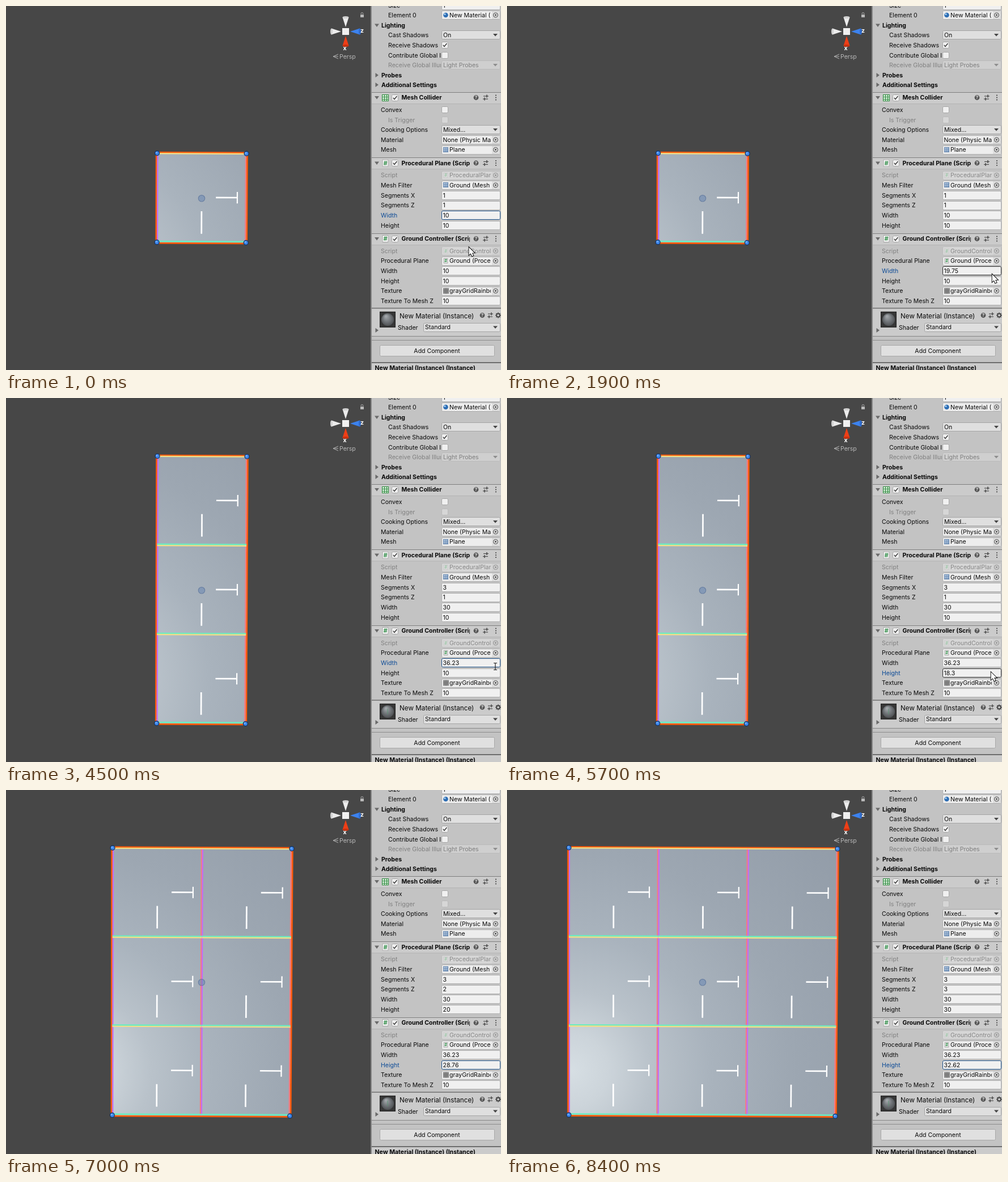
An HTML page with a canvas for the animation above (9200 ms loop, 873 by 642 pixels).

```html
<!DOCTYPE html>
<html lang="en">
<head>
<meta charset="utf-8">
<style>
  html, body { margin: 0; width: 100%; height: 100%; overflow: hidden; background: #474747; }
  canvas { display: block; }
</style>
</head>
<body>
<canvas id="stage" width="873" height="642"></canvas>
<script>
const ctx = document.getElementById('stage').getContext('2d');
const LOOP = 9200, STEP = 100, TAU = Math.PI * 2;

// Keyframes are [time, ...values], linear in between
const widthKeys = [[800, 10], [1900, 19.75], [2100, 21.47], [2900, 23.43], [3300, 26.04], [3800, 34.62], [4100, 36.23]];
const heightKeys = [[5100, 10], [5700, 18.3], [5900, 20.64], [6500, 24.17], [7000, 28.76], [7100, 30.31], [7400, 32.62]];
const cursorPaths = [
  [[0, 816, 425], [100, 816, 425], [500, 757, 467], [600, 757, 467], [700, 747, 467], [800, 747, 467], [2000, 865, 473]],
  [[4500, 863, 474], [4700, 800, 473], [4800, 766, 478], [4900, 758, 488], [5100, 758, 488], [5800, 869, 482]],
  [[7700, 626, 632], [7800, 560, 570], [8000, 390, 503], [8200, 215, 560], [8300, 141, 625]]
];

function sample(keys, t) {
  if (t <= keys[0][0]) return keys[0].slice(1);
  const i = keys.findIndex(k => k[0] >= t);
  if (i < 0) return keys[keys.length - 1].slice(1);
  const a = keys[i - 1], b = keys[i], f = (t - a[0]) / (b[0] - a[0]);
  return a.slice(1).map((v, j) => v + (b[j + 1] - v) * f);
}

function rect(x, y, w, h, fill, border) {
  ctx.fillStyle = fill;
  ctx.fillRect(x, y, w, h);
  if (border) {
    ctx.strokeStyle = border;
    ctx.lineWidth = 1;
    ctx.strokeRect(x + .5, y + .5, w - 1, h - 1);
  }
}

function roundBox(x, y, w, h, fill, border) {
  ctx.beginPath();
  ctx.roundRect(x + .5, y + .5, w - 1, h - 1, 2);
  ctx.fillStyle = fill;
  ctx.fill();
  ctx.strokeStyle = border;
  ctx.lineWidth = 1;
  ctx.stroke();
}

function shape(points, fill, stroke, width = 1) {
  ctx.beginPath();
  points.forEach(p => ctx.lineTo(p[0], p[1]));
  ctx.closePath();
  if (stroke) { ctx.strokeStyle = stroke; ctx.lineWidth = width; ctx.stroke(); }
  if (fill) { ctx.fillStyle = fill; ctx.fill(); }
}

function line(points, color, width = 1) {
  ctx.beginPath();
  points.forEach(p => ctx.lineTo(p[0], p[1]));
  ctx.strokeStyle = color;
  ctx.lineWidth = width;
  ctx.stroke();
}

function disc(x, y, r, fill, stroke, width = 1) {
  ctx.beginPath();
  ctx.arc(x, y, r, 0, TAU);
  if (fill) { ctx.fillStyle = fill; ctx.fill(); }
  if (stroke) { ctx.strokeStyle = stroke; ctx.lineWidth = width; ctx.stroke(); }
}

function text(s, x, y, { color = '#090909', weight = 400, size = 10.56, limit = 873, align = 'left' } = {}) {
  ctx.save();
  ctx.beginPath();
  ctx.rect(0, 0, limit, 642);
  ctx.clip();
  ctx.font = `${weight} ${size}px Inter, sans-serif`;
  ctx.textAlign = align;
  ctx.fillStyle = color;
  ctx.fillText(s, x, Math.round(y + size * .36));
  ctx.restore();
}

// ---- Scene view ----

// Grid units around the plane's centre to screen
const project = (u, v) => [345 + 157.3 * u - .67 * v - .44 * u * v, 338.5 + 157.1 * v + .75 * u];

function drawPlane(nx, nz) {
  const u = nz / 2, v = nx / 2;
  const corners = [project(-u, -v), project(u, -v), project(u, v), project(-u, v)];
  const light = ctx.createRadialGradient(115, 495, 0, 115, 495, 640);
  [[0, '#d6dee3'], [.1, '#ccd4da'], [.22, '#b9c2ca'], [.38, '#a9b3bd'], [.6, '#9da7b2'], [1, '#919ba7']]
    .forEach(([at, color]) => light.addColorStop(at, color));
  shape(corners, light, '#ff5a0a', 5.5);

  for (let i = 0; i < nz; i++) for (let j = 0; j < nx; j++) {
    const l = i - u, t = j - v, r = l + 1, b = t + 1, cx = l + .5, cy = t + .5;
    const seg = (u0, v0, u1, v1, color, w) => line([project(u0, v0), project(u1, v1)], color, w);
    seg(l + .006, t, l + .006, b, '#c26cf6', 2.2);
    seg(r - .007, t, r - .007, b, '#f67a80', 2.2);
    seg(l, t + .003, r, t + .003, '#f3df87', 2.2);
    seg(l, b - .011, r, b - .011, '#6cecc0', 2.6);
    seg(cx + .16, cy - .005, cx + .4, cy - .005, '#fff', 2.6);
    seg(cx + .4, cy - .068, cx + .4, cy + .06, '#fff', 2.2);
    seg(cx, cy + .149, cx, cy + .402, '#fff', 2.7);
  }
  corners.forEach(([x, y]) => {
    disc(x, y, 4, '#3c86ea', '#12305f', 1.2);
    disc(x - 1, y - 1, 1.4, '#79b0f5');
  });
  disc(345, 339.3, 5.7, 'rgba(104,134,178,.55)', 'rgba(74,101,146,.55)', 1.2);
}

function drawGizmo() {
  const cone = (angle, color, dark) => {
    ctx.save();
    ctx.translate(599, 45);
    ctx.rotate(angle);
    shape([[8, 0], [25, -5.5], [25, 5.5]], color);
    ctx.beginPath();
    ctx.ellipse(25, 0, 2, 5.5, 0, 0, TAU);
    ctx.fillStyle = dark;
    ctx.fill();
    ctx.restore();
  };
  cone(-Math.PI / 2, '#ececec', '#d2d2d2');
  cone(Math.PI, '#ececec', '#d2d2d2');
  cone(0, '#3c82ee', '#2f6bcb');
  cone(Math.PI / 2, '#ee3f17', '#c9310f');
  rect(593, 39, 12, 12, '#f0f0f0');
  text('z', 628, 43, { color: '#fff', weight: 700, align: 'center' });
  text('x', 597.5, 74, { color: '#fff', weight: 700, align: 'center' });
  line([[586, 85], [577, 89], [586, 93]], '#b4b4b4');
  line([[577, 89], [586, 89]], '#b4b4b4');
  text('Persp', 588, 89, { color: '#b8b8b8' });
  rect(625, 15, 6, 5, '#b8b8b8');
  ctx.beginPath();
  ctx.arc(628, 14, 2.2, Math.PI, 0);
  ctx.strokeStyle = '#b8b8b8';
  ctx.stroke();
}

// ---- Inspector ----

function foldout(y, open) {
  shape(open ? [[650, y - 2.5], [658, y - 2.5], [654, y + 3]] : [[651.5, y - 4], [657, y], [651.5, y + 4]], '#6a6a6a');
}

function checkbox(x, y, on, disabled) {
  roundBox(x - 6, y - 6, 12, 12, disabled ? '#d6d6d6' : '#f0f0f0', disabled ? '#b9b9b9' : '#a6a6a6');
  if (on) line([[x - 3, y], [x - 1, y + 2.5], [x + 3.5, y - 3]], '#333', 1.4);
}

function helpIcon(x, y) {
  disc(x, y, 4.4, '#555');
  text('?', x, y, { color: '#e6e6e6', weight: 700, size: 8, align: 'center' });
}

function slidersIcon(x, y) {
  line([[x - 4, y - 2.5], [x + 5, y - 2.5]], '#444', 1.1);
  line([[x - 5, y + 2.5], [x + 4, y + 2.5]], '#444', 1.1);
  line([[x + 2, y - 5], [x + 2, y]], '#444', 1.5);
  line([[x - 2, y], [x - 2, y + 5]], '#444', 1.5);
}

function gearIcon(x, y) {
  for (let a = 0; a < 8; a++) {
    const c = Math.cos(a * TAU / 8), s = Math.sin(a * TAU / 8);
    line([[x + 3 * c, y + 3 * s], [x + 5 * c, y + 5 * s]], '#444', 1.6);
  }
  disc(x, y, 2.8, null, '#444', 1.8);
}

function gridIcon(x, y, size, color, fill) {
  rect(x, y, size, size, fill, color);
  for (let i = 1; i < 3; i++) {
    const d = Math.round(size * i / 3) + .5;
    line([[x + d, y], [x + d, y + size]], color);
    line([[x, y + d], [x + size, y + d]], color);
  }
}

function scriptIcon(x, y, size, alpha = 1) {
  ctx.globalAlpha = alpha;
  rect(x - size * .42, y - size / 2, size * .84, size, '#f4f4f4', '#a2a2a2');
  text('#', x, y, { color: '#2e8b46', weight: 700, size: size * .8, align: 'center' });
  ctx.globalAlpha = 1;
}

const fieldIcons = {
  ball: y => { disc(775.5, y, 4.3, '#2e6eb4'); disc(774, y - 1.5, 1.6, '#a9d2f2'); },
  grid: y => gridIcon(771, Math.round(y - 5), 9, '#5c7ea8', '#cfe0f2'),
  script: y => scriptIcon(775.5, y, 9),
  dim: y => scriptIcon(775.5, y, 9, .45),
  texture: y => { rect(771, y - 5, 10, 10, '#858585'); line([[771, y], [781, y]], '#777'); line([[776, y - 5], [776, y + 5]], '#777'); }
};

const fieldTop = y => Math.round(y - 8);

function objectField(y, value, icon, border = '#b0b0b0') {
  const off = icon === 'dim';
  roundBox(768, fieldTop(y), 104, 16, off ? '#d6d6d6' : '#ededed', off ? '#bcbcbc' : border);
  rect(857, fieldTop(y) + 1, 14, 14, off ? '#d0d0d0' : '#dedede');
  const color = off ? '#8d8d8d' : '#444';
  disc(863.5, y, 4, null, color);
  disc(863.5, y, 1.4, color);
  if (icon) fieldIcons[icon](y);
  text(value, icon ? 782 : 770.5, y, { color: off ? '#878787' : '#090909', limit: 855 });
}

function dropdown(x, y, value, off) {
  roundBox(x, fieldTop(y), 872 - x, 16, off ? '#cfcfcf' : '#dfdfdf', off ? '#bbb' : '#a5a5a5');
  text(value, x + 3, y, { color: off ? '#7e7e7e' : '#090909' });
  shape([[859, y - 2], [867, y - 2], [863, y + 2.5]], off ? '#8d8d8d' : '#444');
}

function numberField(y, value, border = '#b0b0b0') {
  roundBox(768, fieldTop(y), 104, 16, '#f0f0f0', border);
  text(value, 770.5, y);
}

function label(s, x, y, color) { text(s, x, y, { color, limit: 767 }); }

function header(y, title, icon) {
  const top = Math.round(y - 10);
  rect(645, top, 228, 20, '#cbcbcb');
  rect(645, top, 228, 1, '#7f7f7f');
  rect(645, top + 20, 228, 1, '#b4b4b4');
  foldout(y, true);
  if (icon === 'mesh') gridIcon(663, top + 4, 12, '#2d8a3e', '#d5ecd8');
  else scriptIcon(669, y, 13);
  checkbox(686, Math.round(y), true);
  text(title, 697.5, y, { weight: 700, limit: 818 });
  helpIcon(829, y);
  slidersIcon(846, y);
  [-4, 0, 4].forEach(d => disc(864, y + d, 1.1, '#444'));
}

function drawInspector(t, state) {
  const GRAY = '#808080', BLUE = '#0b4a96';
  rect(643, 0, 230, 642, '#c3c3c3');
  rect(643, 0, 2, 642, '#858585');

  label('Size', 674, -1);
  numberField(-1, '1');
  label('Element 0', 674, 16);
  objectField(16, 'New Material (Instance)', 'ball');
  [[34, 'Lighting', true], [122, 'Probes'], [139, 'Additional Settings']].forEach(([y, s, open]) => {
    foldout(y, open);
    text(s, 662, y, { weight: 700 });
  });
  label('Cast Shadows', 674, 51.5);
  dropdown(768, 51, 'On');
  label('Receive Shadows', 674, 69);
  checkbox(774, 69, true);
  label('Contribute Global Illumination', 674, 87);
  checkbox(774, 87);
  label('Receive Global Illumination', 674, 104.5, GRAY);
  dropdown(768, 104, 'Light Probes', true);

  header(161.5, 'Mesh Collider', 'mesh');
  label('Convex', 661, 183);
  checkbox(774, 183);
  label('Is Trigger', 674, 201, GRAY);
  checkbox(774, 201, false, true);
  label('Cooking Options', 661, 218.5);
  dropdown(768, 218, 'Mixed...');
  label('Material', 661, 236);
  objectField(236, 'None (Physic Material)');
  label('Mesh', 661, 253.5);
  objectField(253.5, 'Plane', 'grid');

  header(277, 'Procedural Plane (Script)');
  label('Script', 661, 298.5, GRAY);
  objectField(298.5, 'ProceduralPlane', 'dim');
  label('Mesh Filter', 661, 316);
  objectField(316, 'Ground (Mesh Filter)', 'grid');

  header(410.5, 'Ground Controller (Script)');
  label('Script', 661, 432, GRAY);
  objectField(432, 'GroundController', 'dim');
  const hovered = y => state.cursor && state.cursor[0] >= 768 && Math.abs(state.cursor[1] - y) < 8.5;
  label('Procedural Plane', 661, 449.5);
  objectField(449.5, 'Ground (Procedural Plane)', 'script', hovered(449.5) ? '#6c6c6c' : undefined);
  label('Texture', 661, 502.5);
  objectField(502.5, 'grayGridRainbow', 'texture');

  const focus = t < 900 ? 369 : t < 5200 ? 467 : 485;
  const dragging = (t >= 900 && t <= 2000) || (t >= 5200 && t <= 5800);
  [
    [334, 'Segments X', state.nx], [351.5, 'Segments Z', state.nz],
    [369, 'Width', state.nx * 10], [387, 'Height', state.nz * 10],
    [467, 'Width', state.width], [485, 'Height', state.height],
    [520, 'Texture To Mesh Z', 10]
  ].forEach(([y, name, value]) => {
    const focused = y === focus;
    label(name, 661, y, focused ? BLUE : undefined);
    numberField(y, String(value), focused ? (dragging && hovered(y) ? '#2c2c2c' : '#1d5087') : undefined);
  });

  drawMaterial(t);
}

function drawMaterial(t) {
  rect(645, 532, 228, 50, '#cbcbcb');
  rect(645, 532, 228, 2, '#858585');
  rect(645, 582, 228, 1, '#858585');
  rect(645, 589, 228, 1, '#8a8a8a');
  rect(659, 539, 28, 28, '#363636', '#222');
  const ball = ctx.createRadialGradient(670, 547, 1, 673, 553, 12);
  ball.addColorStop(0, '#a3a7ab');
  ball.addColorStop(.5, '#74787c');
  ball.addColorStop(1, '#4b4d50');
  disc(673, 553, 11, ball);
  if (t >= 2900) line([[673, 548], [673, 558]], '#55976f', .8);
  foldout(572, false);
  text('New Material (Instance)', 694, 546.5, { size: 11.7 });
  helpIcon(840, 545.5);
  slidersIcon(854, 545.5);
  gearIcon(868, 545.5);
  text('Shader', 691, 567);
  dropdown(736, 566.5, 'Standard');
  roundBox(659, 598, 203, 20, '#e0e0e0', '#a8a8a8');
  text('Add Component', 760, 608, { align: 'center' });
  rect(645, 628, 228, 14, '#cbcbcb');
  rect(645, 628, 228, 2, '#6d6d6d');
  text('New Material (Instance) (Instance)', 650.5, 638.5, { weight: 700 });
}

function drawCursor([x, y], beam) {
  if (beam) {
    line([[x - 3, y - 6.5], [x + 3, y - 6.5]], '#222');
    line([[x, y - 6.5], [x, y + 5.5]], '#222', 1.2);
    line([[x - 3, y + 5.5], [x + 3, y + 5.5]], '#222');
    return;
  }
  const arrow = [[0, 0], [0, 13.5], [3.2, 10.6], [5.4, 15.6], [7.8, 14.6], [5.6, 9.7], [9.8, 9.7]];
  shape(arrow.map(p => [x + .5 + p[0], y + .7 + p[1]]), '#fff', '#000', 1.8);
}

function draw(t) {
  const width = sample(widthKeys, t)[0], height = sample(heightKeys, t)[0];
  const path = cursorPaths.find(p => t >= p[0][0] && t <= p[p.length - 1][0]);
  const state = {
    width: +width.toFixed(2),
    height: +height.toFixed(2),
    nx: Math.floor(width / 10),
    nz: Math.floor(height / 10),
    cursor: path && sample(path, t)
  };
  rect(0, 0, 873, 642, '#474747');
  drawPlane(state.nx, state.nz);
  drawGizmo();
  drawInspector(t, state);
  if (state.cursor) drawCursor(state.cursor, t >= 4500 && t <= 4700);
}

const start = performance.now();
function tick() {
  const t = Math.max(0, performance.now() - start) % LOOP;
  draw(Math.floor(t / STEP) * STEP);
  requestAnimationFrame(tick);
}
tick();
</script>
</body>
</html>
```
